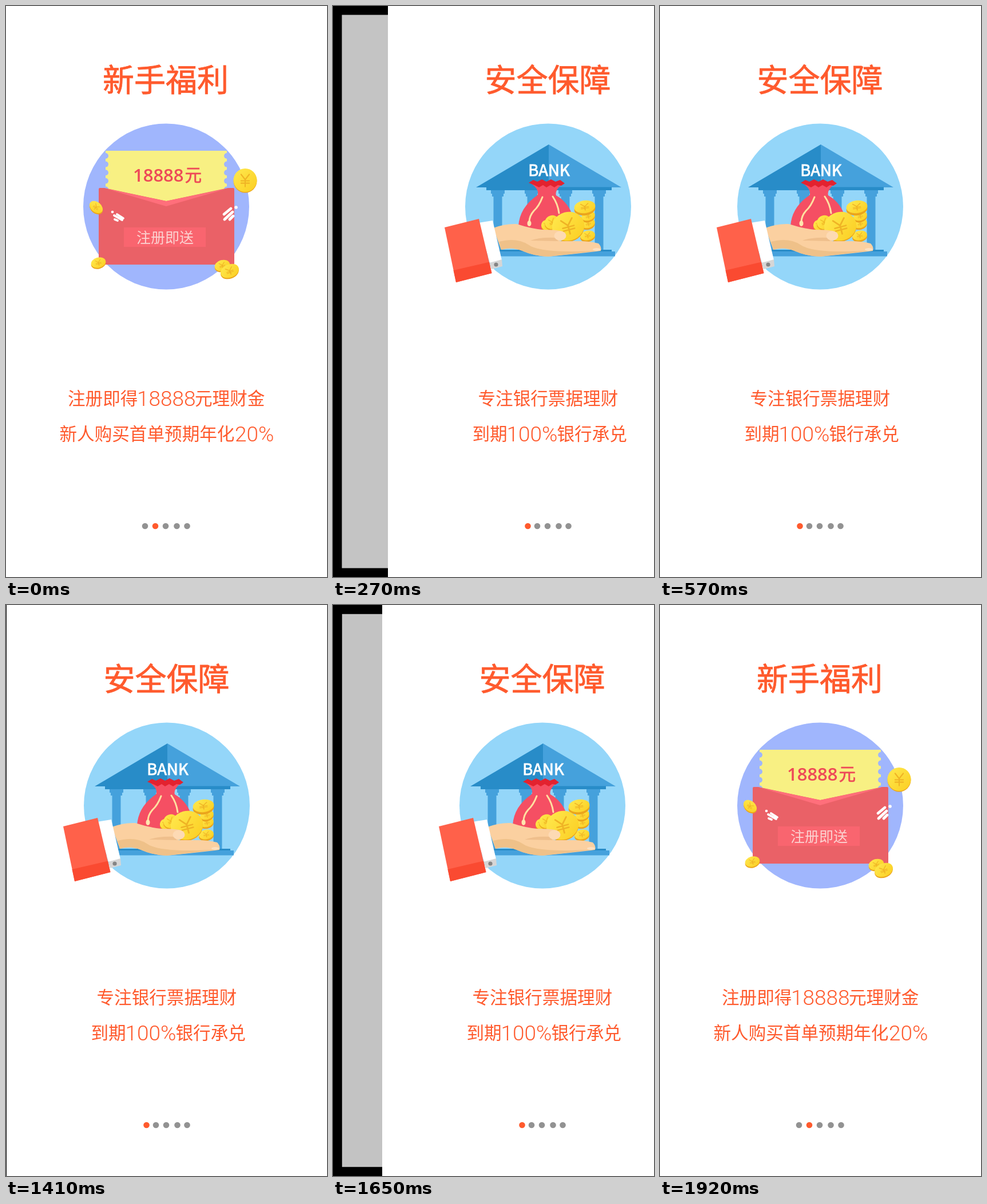
An HTML page for the animation above (2370 ms loop, 561 by 998 pixels).

```html
<!DOCTYPE html>
<html lang="zh-CN">
<head>
<meta charset="utf-8">
<style>
html, body { margin: 0; width: 100%; height: 100%; overflow: hidden; background: #000; }
svg { display: block; width: 100%; height: 100%; }
text { font-family: "Noto Sans CJK SC", "Noto Sans CJK", sans-serif; white-space: pre; }
.title { font-size: 55px; fill: #ff5a2d; stroke: #ff5a2d; stroke-width: .8px; }
.line { font-size: 30.6px; fill: #ff5a2d; }
.num { font: 300 37px Roboto, "Liberation Sans", sans-serif; }
</style>
</head>
<body>
<svg viewBox="0 0 561 998" preserveAspectRatio="none">
  <defs>
    <linearGradient id="gold" x2="1" y2="1">
      <stop stop-color="#ffe94f"/><stop offset="1" stop-color="#fbce22"/>
    </linearGradient>
  </defs>
  <rect width="561" height="998"/>
  <g id="gift"></g>
  <g id="bank"></g>
</svg>
<script>
const W = 561, H = 998, LOOP = 2370, STEP = 30, INSET = 18.1, DIM = .267;
const gift = document.getElementById('gift');
const bank = document.getElementById('bank');

const shape = (d, fill) => `<path d="${d}" fill="${fill}"/>`;
const stroke = (d, color, w) =>
  `<path d="${d}" fill="none" stroke="${color}" stroke-width="${w}" stroke-linecap="round"/>`;
const rect = (x, y, w, h, fill, r = 0) =>
  `<rect x="${x}" y="${y}" width="${w}" height="${h}" rx="${r}" fill="${fill}"/>`;
const disc = (x, y, r, fill) => `<circle cx="${x}" cy="${y}" r="${r}" fill="${fill}"/>`;
const text = (x, y, str, attrs) => `<text x="${x}" y="${y}" ${attrs}>${str}</text>`;
const line = (x, y, str) => text(x, y, str, 'class="line"');
const num = (x, y, str) => text(x, y, str, 'class="line num"');

// Yen coin: a rim shifted down behind a golden face
function coin(x, y, rx, ry, turn = 0, rim = 2) {
  const at = dy => `translate(${x} ${y + dy}) rotate(${turn}) scale(${rx / 20} ${ry / 20})`;
  return `<circle r="20" fill="#eba51c" transform="${at(rim)}"/>
    <g transform="${at(0)}"><circle r="20" fill="url(#gold)"/>
    ${stroke('M-7-10L0-1L7-10M0-1V11M-7 1H7M-7 5H7', '#efb325', 2)}</g>`;
}

function dots(xs, active) {
  return xs.map((x, i) => disc(x, 909, 5.3, i === active ? '#ff5a2d' : '#929292')).join('');
}

function giftArt() {
  let notches = '';
  for (let i = 0; i < 5; i++)
    for (const x of [174, 386]) notches += disc(x, 262 + i * 14.6, 5, '#a0b6fd');
  return disc(280, 350.5, 145, '#a0b6fd') +
    rect(174, 253, 212, 95, '#f8f083') + notches +
    shape('M162 320q0-2 2-2h8L280 341L388 318h9q2 0 2 2V450q0 2-2 2H164q-2 0-2-2Z', '#ea6167') +
    shape('M174 319L280 341L387 319L280 350Z', '#ff6f7b') +
    text(222, 307, '18888', 'font-size="31" fill="#ee4a58" style="font-family:\'Open Sans\',sans-serif;font-weight:600"') +
    text(312.5, 306, '元', 'font-size="29.5" fill="#ee4a58" stroke="#ee4a58" stroke-width=".7"') +
    rect(206, 387, 143, 34, '#f9656f') +
    text(228, 414, '注册即送', 'font-size="25" fill="#fbd3d1"') +
    disc(186, 360, 2.3, '#fff') +
    stroke('M194 364L205 371M189 366L203 374M190 373l5 2', '#fff', 3.8) +
    disc(402, 352, 2.8, '#fff') +
    stroke('M381 364L393 354M382 373L396 360M391 373L397 367', '#fff', 4.8) +
    coin(418, 304.5, 20.5, 20.5, 0, 1.5) +
    coin(157.5, 351.5, 13, 9, 40) +
    coin(161.5, 448.5, 13, 9, -15) +
    coin(378, 453.5, 13.5, 9.5, -15) +
    coin(391, 463, 16.5, 11.5, -22);
}

function bankArt() {
  const dark = '#288cc8', blue = '#45a1dc';
  let columns = '';
  for (const x of [192, 251, 310, 369])
    columns += rect(x - 12, 322, 24, 6, blue) + rect(x - 10, 328, 20, 5, blue) +
      rect(x - 7.5, 333, 15, 94, blue);
  return disc(280, 350.5, 145, '#94d6f9') + columns +
    shape('M281 242V317H154Z', dark) + shape('M281 242L408 317H281Z', blue) +
    rect(172, 316.5, 219, 5.5, dark) +
    rect(172, 426, 219, 3, dark) + rect(164, 429, 233, 8.5, blue) +
    text(281.5, 297, 'BANK', 'font-size="27.5" fill="#fff" stroke="#fff" stroke-width=".9" text-anchor="middle"') +
    // money bag
    shape('M250 310Q266 322 261 331Q230 352 228 385Q228 402 245 405H315Q327 395 324 372Q318 345 294 331Q291 322 306 310Z', '#f54f63') +
    shape('M246 309l8-5 7 3 8-4 8 4 8-4 8 4 8-3 8 6-6 4-6-1-6 4-7-4-7 4-6-4-7 4-6-3Z', '#e3222f') +
    stroke('M270 334Q264 350 255 358Q247 367 247 378M288 333Q297 346 299 362', '#ffe0a0', 3) +
    `<ellipse cx="247" cy="380" rx="3.5" ry="5" fill="#ffe6ae"/>` +
    // coins in the palm
    coin(349, 401, 13, 8.5, -10, 3) + coin(350, 380, 12, 8, -15, 3) +
    coin(350, 367, 12, 8, -15, 3) + coin(344, 351, 18.5, 11, -8, 4) +
    coin(277, 383, 9, 9, -20) + coin(287, 378, 13, 12, -20) +
    coin(315, 385, 28.5, 25, -15, 2) +
    // hand
    shape('M184 388Q205 380 225 381Q250 389 270 391Q293 391 302 393Q312 396 311 403Q308 410 298 411H335Q352 411 368 415Q374 421 372 428Q330 433 280 438Q255 437 235 428Q215 420 198 426Z', '#fbd0a0') +
    shape('M194 412Q225 404 245 417Q268 434 372 427Q325 433 280 438Q255 437 235 428Q215 420 198 426Z', '#efc189') +
    shape('M249 410Q265 404 292 405L298 411Z', '#efbf8c') +
    `<ellipse cx="301" cy="401.5" rx="10.5" ry="8" fill="#fddab4"/>` +
    `<ellipse cx="365" cy="425.5" rx="7" ry="2.6" fill="#fde0c0"/>` +
    // sleeve
    shape('M158 379L183 375L199 444L178 449Z', '#fff') +
    shape('M177 449L199 443L200 455L181 460Z', '#d6d6d6') + disc(189, 452, 3.6, '#858585') +
    shape('M99 387L159 372L181.5 467L119 483Z', '#ff614a') +
    shape('M114.5 462L177 447.5L181.5 467L119 483Z', '#fa4a31');
}

gift.innerHTML = rect(0, 0, W, H, '#fff') +
  text(169, 148.5, '新手福利', 'class="title"') + giftArt() +
  line(108, 696.5, '注册即得') + num(229, 698.5, '18888') + line(330, 696.5, '元理财金') +
  line(93.5, 758.5, '新人购买首单预期年化') + num(400, 760.5, '20%') +
  dots([243, 261, 279, 298.5, 316.5], 1) +
  `<rect id="shade" width="${W}" height="${H}"/>`;

bank.innerHTML = rect(0, 0, W, H, '#fff') +
  text(169.5, 148.5, '安全保障', 'class="title"') + bankArt() +
  line(157.5, 696.5, '专注银行票据理财') +
  line(147.5, 758.5, '到期') + num(207.5, 760.5, '100%') + line(295.5, 758.5, '银行承兑') +
  dots([244.5, 261, 279, 298.5, 315.5], 0);

const shade = document.getElementById('shade');

function bezier(x1, y1, x2, y2) {
  const at = (a, b, s) => 3 * a * s * (1 - s) ** 2 + 3 * b * s * s * (1 - s) + s ** 3;
  return p => {
    let lo = 0, hi = 1;
    for (let i = 0; i < 30; i++) {
      const mid = (lo + hi) / 2;
      if (at(x1, x2, mid) < p) lo = mid; else hi = mid;
    }
    return at(y1, y2, lo);
  };
}
const slideIn = bezier(.31, .1, .1, 1);
const slideOut = bezier(1, 0, .4625, 1);

// Share of the lower page that is uncovered, 0 to 1
function opening(t) {
  if (t <= 0) return 1;
  if (t < 570) return 1 - slideIn(t / 570);
  if (t <= 1380) return 0;
  return t < 1920 ? slideOut((t - 1380) / 540) : 1;
}

function draw(now) {
  const t = Math.floor((now % LOOP) / STEP) * STEP;
  const x = Math.round(opening(t) * W);
  const depth = (1 - x / W) ** .8;
  const inset = INSET * depth;
  bank.setAttribute('transform', `translate(${x})`);
  gift.setAttribute('transform', `translate(${inset} ${inset}) scale(${1 - 2 * inset / H})`);
  shade.setAttribute('opacity', DIM * depth);
}

let start;
function tick(now) {
  start ??= now;
  draw(now - start);
  requestAnimationFrame(tick);
}
draw(0);
requestAnimationFrame(tick);
</script>
</body>
</html>
```
